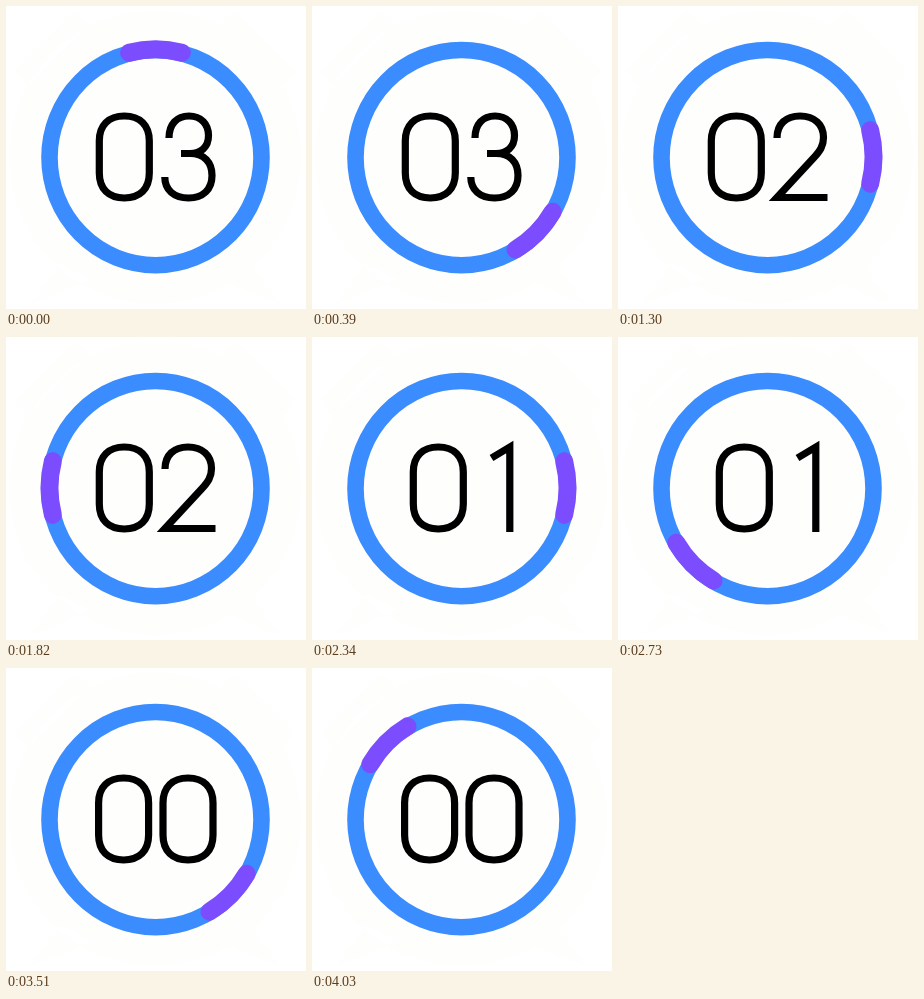
An HTML page with a canvas that plays this animation: 300x303 px, repeating every 4.16 s.

```html
<!DOCTYPE html>
<html lang="en">
<head>
<meta charset="utf-8">
<title>Countdown</title>
<style>
  html, body { margin: 0; width: 100%; height: 100%; overflow: hidden; background: #fff; }
  canvas { display: block; width: 300px; height: 303px; }
</style>
</head>
<body>
<canvas id="stage" width="300" height="303"></canvas>
<script>
const ctx = document.getElementById('stage').getContext('2d');
const STEP = 130, STEPS_PER_TURN = 8, TURNS = 4;
const CX = 149.5, CY = 151.6;

const zero = x => new Path2D(
  `M${x} 135 C${x} 119 ${x + 9.5} 110 ${x + 25} 110 S${x + 50} 119 ${x + 50} 135
   V167 C${x + 50} 183 ${x + 40.5} 192 ${x + 25} 192 S${x} 183 ${x} 167 Z`);

const three = new Path2D(
  `M163 132 C163 118 171 110 183 110 C195 110 202.5 118 202.5 129.5
   C202.5 141 195 147.5 184 147.5 H175 H184 C198 147.5 206 156 206 169.5
   C206 183.5 197 192 182.5 192 C168 192 158.8 184 158.8 171`);

const two = new Path2D(
  `M159 132 C159 118 168 110 182 110 C196.5 110 205.5 118.5 205.5 131.5
   C205.5 140 202 145 196 151.5 L159 191.5 H209.5`);

const one = new Path2D('M179.5 121 L197.8 110 V195');

// One pair of digits per turn, counting down
const digits = [
  [zero(93.3), three],
  [zero(93.3), two],
  [zero(101.3), one],
  [zero(92.6), zero(157)]
];

// Faint alarm clock behind the dial: body, bells and legs
const clock = new Path2D('M3 151 a146 147 0 1 0 292 0 a146 147 0 1 0 -292 0 Z');
for (const side of [x => x, x => 298 - x]) {
  const shape = points => {
    points.forEach(([x, y], i) => clock[i ? 'lineTo' : 'moveTo'](side(x), y));
    clock.closePath();
  };
  shape([[9, 65], [69, 4], [83, 18], [22, 80]]);
  shape([[24, 299], [54, 257], [86, 273]]);
}

function arc(cy, rx, ry, from, to, color, width) {
  ctx.beginPath();
  ctx.ellipse(CX, cy, rx, ry, 0, from, to);
  ctx.strokeStyle = color;
  ctx.lineWidth = width;
  ctx.stroke();
}

function draw(step) {
  const turn = Math.floor(step / STEPS_PER_TURN);
  const angle = (step % STEPS_PER_TURN) / STEPS_PER_TURN * Math.PI * 2 - Math.PI / 2;
  const half = Math.PI * 14.4 / 180;

  ctx.fillStyle = '#fff';
  ctx.fillRect(0, 0, 300, 303);
  ctx.fillStyle = '#fefefc';
  ctx.fill(clock, 'nonzero');

  ctx.lineCap = 'round';
  arc(CY, 106, 107.6, 0, Math.PI * 2, '#3b8cff', 16.6);
  arc(CY - 0.6, 106, 107.6, angle - half, angle + half, '#7c4dff', 18);

  ctx.lineCap = 'butt';
  ctx.lineJoin = 'miter';
  ctx.strokeStyle = '#000';
  ctx.lineWidth = 7.2;
  for (const glyph of digits[turn]) ctx.stroke(glyph);
}

const start = performance.now();
function tick() {
  const elapsed = performance.now() - start;
  draw(Math.floor(elapsed / STEP) % (STEPS_PER_TURN * TURNS));
  requestAnimationFrame(tick);
}
tick();
</script>
</body>
</html>
```
